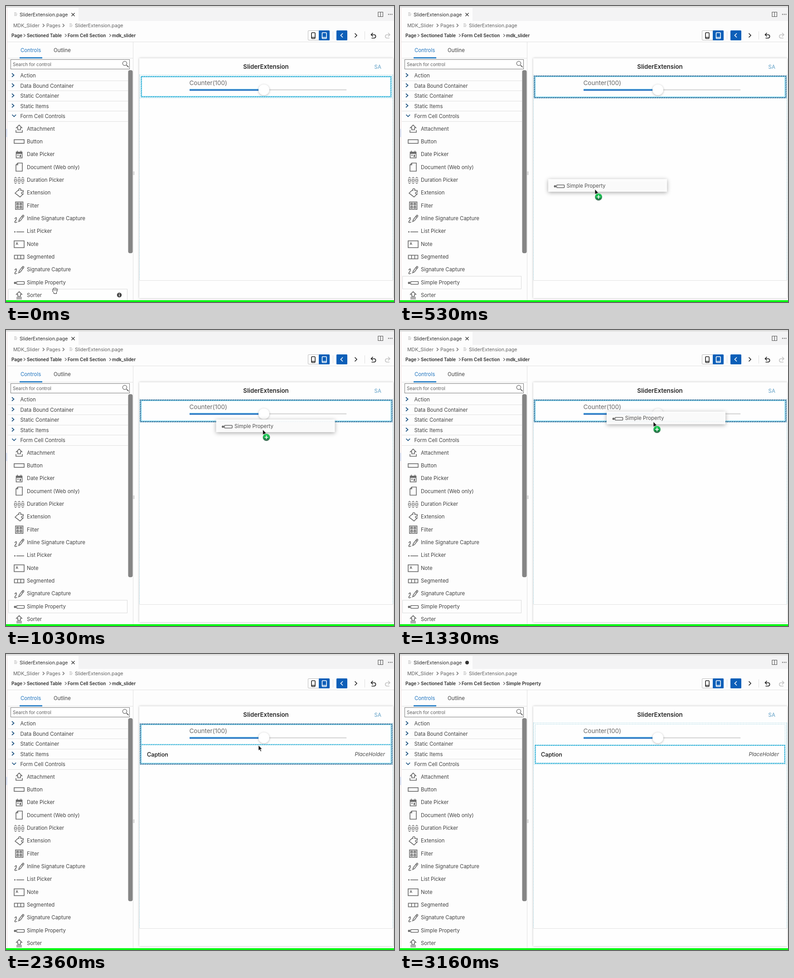
Animation, 856 px wide and 655 px high, one loop 3560 ms. Source, as an HTML page:

```html
<!DOCTYPE html>
<html lang="en">
<head>
<meta charset="utf-8">
<title>Slider extension editor</title>
<style>
  html, body { margin: 0; width: 100%; height: 100%; overflow: hidden; background: #fdfdfd; }
  svg { display: block; width: 856px; height: 655px; font: 11.35px Inter, "Liberation Sans", sans-serif; }
  text { fill: #404040; white-space: pre; }
  .path text { font-size: 10.65px; fill: #616161; }
  .crumb text { font-size: 9.95px; font-weight: 600; fill: #2c2c2c; }
  .icon { fill: none; stroke: #686868; stroke-width: 1.6; }
  .icon .solid { fill: #686868; stroke: none; }
  .line { fill: none; stroke: #e1e1e1; }
  .chev { fill: none; stroke: #1f5482; stroke-width: 1.7; }
  .small { fill: none; stroke: #555; stroke-width: 1.1; }
  .cyan { fill: none; stroke: url(#cyanDash); stroke-width: 2.2; }
  .blue { fill: none; stroke: url(#blueDash); stroke-width: 2.2; }
  .pale { fill: none; stroke: #a9d9e5; stroke-dasharray: 2 1.5; }
  .glow { fill: none; stroke: #8bdcf2; stroke-width: 1.6; }
  .hover { fill: #fefefe; stroke: #dadada; }
  .card { filter: drop-shadow(0 0 2px rgba(0,0,0,.25)); }
  .knob { filter: drop-shadow(0 1px 2px rgba(0,0,0,.28)); }
  .ghost { filter: drop-shadow(0 2px 5px rgba(0,0,0,.36)); }
</style>
</head>
<body>
<svg viewBox="0 0 856 655">
  <defs>
    <linearGradient id="badge" x2="0" y2="1">
      <stop offset="0" stop-color="#20d957"/><stop offset=".55" stop-color="#12a548"/><stop offset="1" stop-color="#36584a"/>
    </linearGradient>
    <!-- diagonal stripes read as dashes on both level and upright edges -->
    <linearGradient id="cyanDash" gradientUnits="userSpaceOnUse" x1="0" y1="0" x2="2.500" y2="2.500" spreadMethod="repeat">
      <stop offset=".55" stop-color="#2fb0d6"/><stop offset=".7" stop-color="#b4e5f2"/><stop offset=".9" stop-color="#b4e5f2"/><stop offset="1" stop-color="#2fb0d6"/>
    </linearGradient>
    <linearGradient id="blueDash" gradientUnits="userSpaceOnUse" x1="0" y1="0" x2="2.500" y2="2.500" spreadMethod="repeat">
      <stop offset=".55" stop-color="#2a6c96"/><stop offset=".7" stop-color="#a5cfe4"/><stop offset=".9" stop-color="#a5cfe4"/><stop offset="1" stop-color="#2a6c96"/>
    </linearGradient>
  </defs>
  <rect width="856" height="655" fill="#fdfdfd"/>
  <rect x="160" y="4" width="696" height="29" fill="#f3f3f4"/>
  <rect width="856" height="3.5" fill="#dedede"/>
  <path d="M2.5 4V651" stroke="#f5dfdf"/>
  <rect y="272" width="3" height="18" fill="#dde2f3"/>

  <!-- file tab and paths -->
  <g class="path">
    <path class="small" stroke-opacity=".5" d="M18 15h5M18 18h7M18 21h6M140 39.500h5M140 42.500h7M140 45.500h6"/>
    <text x="30" y="23" style="fill:#2c2c2c">SliderExtension.page</text>
    <text x="16" y="47">MDK_Slider</text>
    <text x="89" y="47">Pages</text>
    <text x="152" y="47">SliderExtension.page</text>
    <path class="small" d="M81 39.500l3.500 3.500l-3.500 3.500M125 39.500l3.500 3.500l-3.500 3.500"/>
  </g>
  <path id="close" d="M144.500 15.500l7 7m0-7l-7 7" stroke="#333" stroke-width="1.3"/>
  <circle id="dirty" cx="148" cy="19" r="4" fill="#333"/>
  <g class="crumb">
    <text x="12" y="69">Page</text>
    <text x="46" y="69">Sectioned Table</text>
    <text x="136" y="69">Form Cell Section</text>
    <text x="234" y="69" id="leaf"></text>
    <path class="small" d="M39 62l3.500 3.200l-3.500 3.200M130 62l3.500 3.200l-3.500 3.200M228 62l3.500 3.200l-3.500 3.200"/>
  </g>

  <!-- toolbar -->
  <path class="small" d="M821 13.500h10.500v10h-10.500zM826.300 13.500v10"/>
  <path d="M843 18.500h1.800m2 0h1.800m2 0h1.800" stroke="#555" stroke-width="1.8"/>
  <rect x="666.500" y="54.500" width="47" height="21" rx="1.500" fill="#fff" stroke="#bcbcbc"/>
  <rect x="690" y="54" width="24" height="22" rx="1.500" fill="#0c5fb8"/>
  <rect x="729" y="54" width="24" height="22" rx="1.500" fill="#0c5fb8"/>
  <g fill="none" stroke-width="1.6">
    <rect x="674" y="59" width="8" height="13" rx="1.500" stroke="#222"/>
    <path d="M674 69.500h8" stroke="#222"/>
    <rect x="697.500" y="59" width="9.500" height="13" rx="1" stroke="#fff"/>
    <path d="M697.500 69.500h9.500" stroke="#fff"/>
    <path d="M743 60.500l-4.500 4.500l4.500 4.500" stroke="#fff"/>
    <path d="M769.500 60.500l4.500 4.500l-4.500 4.500" stroke="#222"/>
    <path d="M721.500 56v18M791.500 56v18" stroke="#dedede" stroke-width="1"/>
    <path d="M809.500 59.500l-4 4l4 4M806 63.500h6.500a3.800 3.800 0 0 1 0 7.500h-6" stroke="#222"/>
    <path d="M843 59.500l4 4l-4 4M846.500 63.500h-6.500a3.800 3.800 0 0 0 0 7.500h6" stroke="#c4c4c4"/>
  </g>
  <path class="line" d="M3 79.500H856M280.500 80V651M4 115.500H280"/>

  <!-- control list -->
  <text x="32" y="102" style="fill:#1f74bf">Controls</text>
  <text x="105" y="102">Outline</text>
  <rect x="30" y="113.500" width="50" height="2.500" fill="#0f70bf"/>
  <rect x="10.500" y="118.500" width="262" height="21" fill="#fff" stroke="#7c7c7c"/>
  <text x="15" y="132.500" font-size="10" style="fill:#5c5c5c">Search for control</text>
  <path d="M266 131l4.500 4.500" stroke="#666" stroke-width="1.8"/>
  <circle cx="262" cy="127" r="4.600" fill="none" stroke="#666" stroke-width="1.300"/>
  <g id="groups"></g>
  <g id="hoverSorter">
    <rect class="hover" x="5.500" y="626.500" width="262" height="28"/>
    <circle cx="250" cy="639.500" r="5.200" fill="#444"/>
    <path d="M250 638.500v4M250 636v1.300" stroke="#fff" stroke-width="1.500"/>
  </g>
  <rect id="hoverSimple" class="hover" x="5.500" y="598" width="262" height="28"/>
  <g id="items"></g>
  <rect x="269.500" y="142" width="10" height="405" rx="4" fill="#858585"/>
  <path d="M280.800 366v8M282.800 366v8" stroke="#bbb"/>

  <!-- page preview -->
  <rect class="card" x="294" y="115.500" width="560" height="531" fill="#fefefe"/>
  <text x="573.500" y="139" text-anchor="middle" font-size="13.25" font-weight="600" style="fill:#262626">SliderExtension</text>
  <text x="812.500" y="138.500" font-size="11.500" style="fill:#5b9cc4">SA</text>
  <path class="line" d="M294 607.500H854"/>
  <path class="pale" d="M294.500 152V607M853.500 152V607"/>
  <text x="404.500" y="175" font-size="13.5" style="fill:#666">Counter(100)</text>
  <path d="M557 185.500H750" stroke="#dedede" stroke-width="3" stroke-linecap="round"/>
  <path d="M405 184.200H558" stroke="#6cc8ec" stroke-width="1.200"/>
  <path d="M405 186H560" stroke="#1f6fc0" stroke-width="2.800"/>
  <circle class="knob" cx="569" cy="185.500" r="12" fill="#fff"/>
  <g id="property">
    <text x="311" y="226.500" font-size="12.6" font-weight="500" style="fill:#0c0c0c">Caption</text>
    <text x="836" y="225.500" font-size="11.5" font-style="italic" text-anchor="end" style="fill:#484848">PlaceHolder</text>
  </g>
  <g id="pickedSlider">
    <rect class="pale" x="295" y="152.500" width="558" height="51.500"/>
    <rect class="glow" x="299.500" y="157.500" width="548.500" height="42" stroke-opacity=".5"/>
    <rect class="cyan" x="298.500" y="156" width="551" height="45"/>
  </g>
  <g id="target">
    <rect class="glow" id="targetGlow" x="298.500" y="156.500" width="550.500"/>
    <rect class="blue" id="targetEdge" x="296.500" y="155" width="555"/>
    <path class="cyan" id="split" d="M298 200.500H850"/>
  </g>
  <g id="pickedProperty">
    <rect class="pale" x="295" y="152.500" width="558" height="92"/>
    <path class="pale" d="M298.500 201V155.500H849.500V201"/>
    <rect class="cyan" x="298.500" y="202" width="550.500" height="40"/>
  </g>
  <g id="label">
    <rect x="298" y="202.500" width="79.500" height="12.500" fill="#2d7cc4"/>
    <text x="300" y="212.500" font-size="9.87" style="fill:#fff">Simple Property</text>
  </g>
  <rect y="651" width="856" height="4" fill="#08f813"/>

  <!-- dragged control and pointers -->
  <g id="drag">
    <g id="ghost">
      <rect class="ghost" x="-111" y="-39.500" width="262" height="28" fill="#fefefe" fill-opacity=".95"/>
      <g id="ghostIcon" transform="translate(-87 -24.500)"></g>
      <text x="-70.500" y="-21" style="fill:#505050">Simple Property</text>
    </g>
    <path d="M-8-17v11.500l2.600-2.200l2.100 4.400l1.800-.9l-2.100-4.200l3.600-.2z" fill="#111" stroke="#fff" stroke-width=".6"/>
    <g id="plus">
      <circle r="8" fill="url(#badge)" stroke="#b9c9bf" stroke-width=".7"/>
      <path d="M-4 0h8M0-4v8" stroke="#fff" stroke-width="1.700"/>
    </g>
  </g>
  <path id="hand" d="M-5 0l-1-3q1-2 2 0l-.6-2q1.300-2 2.300 0q1-2 2.300-.2q1.500-1 2.300.6q1.700-.6 2.200 1l-.5 4l-1.500 3v3h-6v-2l-3-3.500q0-1.400 1.500-.9zM-2.200-3v2.500M0-3.500v3M2.400-3v2.500" fill="#fff" stroke="#222" stroke-width="1"/>
  <g id="move" transform="translate(559 205)">
    <path d="M-3.500 0h7M0-3.500v7" stroke="#222" stroke-width="1.600"/>
    <path d="M-6 0l3-2.600v5.200zM6 0l-3-2.600v5.200zM0-6l-2.600 3h5.200zM0 6l-2.600-3h5.200z" fill="#222"/>
  </g>
</svg>
<script>
const $ = id => document.getElementById(id);
const LOOP = 3560;

const pen = '<path d="M-1 7l1.500-4.500L8-7q2.500-.5 2.500 2L3 5zM6-5l2.500 2.500M-10 1q4-5 4-1t-3.500 7q-1 4 5 1"/>';
const arrow = 'M-3 2.500V-2H-6L0-8L6-2H3V2.500z';
const icons = {
  'Attachment': `<path d="${arrow}M-7 3v5H7V3"/>`,
  'Button': '<rect x="-11" y="-4" width="22" height="8"/>',
  'Date Picker': '<path d="M-6.500-5h13v13h-13zM-4-8v4M4-8v4"/><path class="solid" d="M-6.500-5h13v4h-13zM-4 1h3v2h-3zM1 1h3v5h-3z"/>',
  'Document (Web only)': '<path d="M-3-9H7V9H-7V-5zV-5H-7"/>',
  'Duration Picker': [-8, 0, 8].map(x => `<path d="M${x - 2.5}-1h5v4h-5zM${x - 2.5}-3.500l2.500-2.500l2.500 2.500M${x - 2.5} 5.500l2.500 2.500l2.500-2.500" stroke-width="1.2"/>`).join(''),
  'Extension': '<path d="M-9 1L-3-5h2.500q-1.500-4 2-4t2 4H9V-1q-4-1-4 1.500t4 2L2 9.500z"/>',
  'Filter': '<rect x="-8" y="-8" width="16.500" height="16.500"/><path class="solid" d="M-6-6h5.500v5.500h-5.500zM1-6h5.500v5.500h-5.500zM-6 1h5.500v5.500h-5.500zM1 1h5.500v5.500h-5.500z"/><path d="M-5-3h3.500M2-3h3.500M-5 4h3.500M2 4h3.500" stroke="#fff" stroke-width="1"/>',
  'Inline Signature Capture': pen,
  'List Picker': '<circle class="solid" cx="-9.500" cy="1.500" r="1.500"/><path d="M-6 1.500h17"/>',
  'Note': '<rect x="-11" y="-7" width="22" height="15"/><path d="M-7 2l2.200-5.500l2.200 5.500M-6.200 0h2.800" stroke-width="1.2"/>',
  'Segmented': '<path d="M-10.500-3.500h21v8h-21zM-3.500-3.500v8M3.500-3.500v8"/>',
  'Signature Capture': pen,
  'Simple Property': '<circle class="solid" cx="-9" cy="1" r="2.500"/><rect x="-5.500" y="-2" width="17" height="6" rx="1"/>',
  'Sorter': `<path d="${arrow}M-6 5H6M-6 8H6"/>`
};

$('groups').innerHTML = ['Action', 'Data Bound Container', 'Static Container', 'Static Items', 'Form Cell Controls']
  .map((name, i) => {
    const y = 154 + i * 22.5;
    const chev = i < 4 ? `M13 ${y - 5}l4.500 4l-4.500 4` : `M13.500 ${y - 3.500}l4.300 4.300l4.300-4.300`;
    return `<path class="chev" d="${chev}"/><text x="31.500" y="${y + 4}">${name}</text>
      <path class="line" d="M4 ${Math.floor(y + 11) + .5}H269"/>`;
  }).join('');

$('items').innerHTML = Object.entries(icons).map(([name, art], i) => {
  const y = 271.5 + i * 28.35;
  return `<g class="icon" transform="translate(29 ${y})">${art}</g><text x="46" y="${y + 4}">${name}</text>`;
}).join('');
$('ghostIcon').innerHTML = `<g class="icon">${icons['Simple Property']}</g>`;

// moments at which the picture advances, in ms
const ticks = [0, 30, 90, 130, 200, 260, 400, 460, 530, 600, 660, 730, 830, 930, 1030, 1130, 1230,
  1330, 1430, 1460, 1660, 1830, 2360, 2430, 2530, 2860, 2930, 3000, 3160];

// time, x, y of the drag badge
const route = [[130, 118, 630], [260, 215, 582], [400, 349, 500.5], [730, 575, 302.5], [830, 584, 270],
  [930, 579, 248], [1130, 570, 227], [1330, 567, 220], [1660, 566, 219.5], [1830, 565, 219]];

// visible spans, in ms
const spans = {
  close: [0, 2860], dirty: [2860, LOOP],
  hoverSorter: [0, 30], hoverSimple: [30, 2360],
  hand: [0, 130], drag: [130, 2530], ghost: [130, 2360], plus: [130, 2360], move: [2530, 2930],
  pickedSlider: [0, 130], target: [130, 2430], split: [1430, 2430],
  property: [1430, LOOP], pickedProperty: [2430, LOOP], label: [2530, 2930]
};

function along(t) {
  const i = route.findIndex(p => p[0] > t);
  if (i === 0) return route[0].slice(1);
  if (i < 0) return route[route.length - 1].slice(1);
  const [t0, x0, y0] = route[i - 1], [t1, x1, y1] = route[i];
  const k = (t - t0) / (t1 - t0);
  return [x0 + (x1 - x0) * k, y0 + (y1 - y0) * k];
}

function draw(time) {
  const t = ticks.filter(v => v <= time).pop();
  for (const id in spans) {
    const [from, to] = spans[id];
    $(id).style.display = t >= from && t < to ? '' : 'none';
  }
  $('drag').setAttribute('transform', `translate(${along(t)})`);
  $('hand').setAttribute('transform', t < 30 ? 'translate(109 630)' : 'translate(109 622)');
  const extra = t < 1430 ? 0 : 40.5;
  $('targetEdge').setAttribute('height', 48 + extra);
  $('targetGlow').setAttribute('height', 44.5 + extra);
  $('leaf').textContent = t < 2430 ? 'mdk_slider' : 'Simple Property';
}

const start = performance.now();
function loop() {
  draw((performance.now() - start) % LOOP);
  requestAnimationFrame(loop);
}
loop();
</script>
</body>
</html>
```
